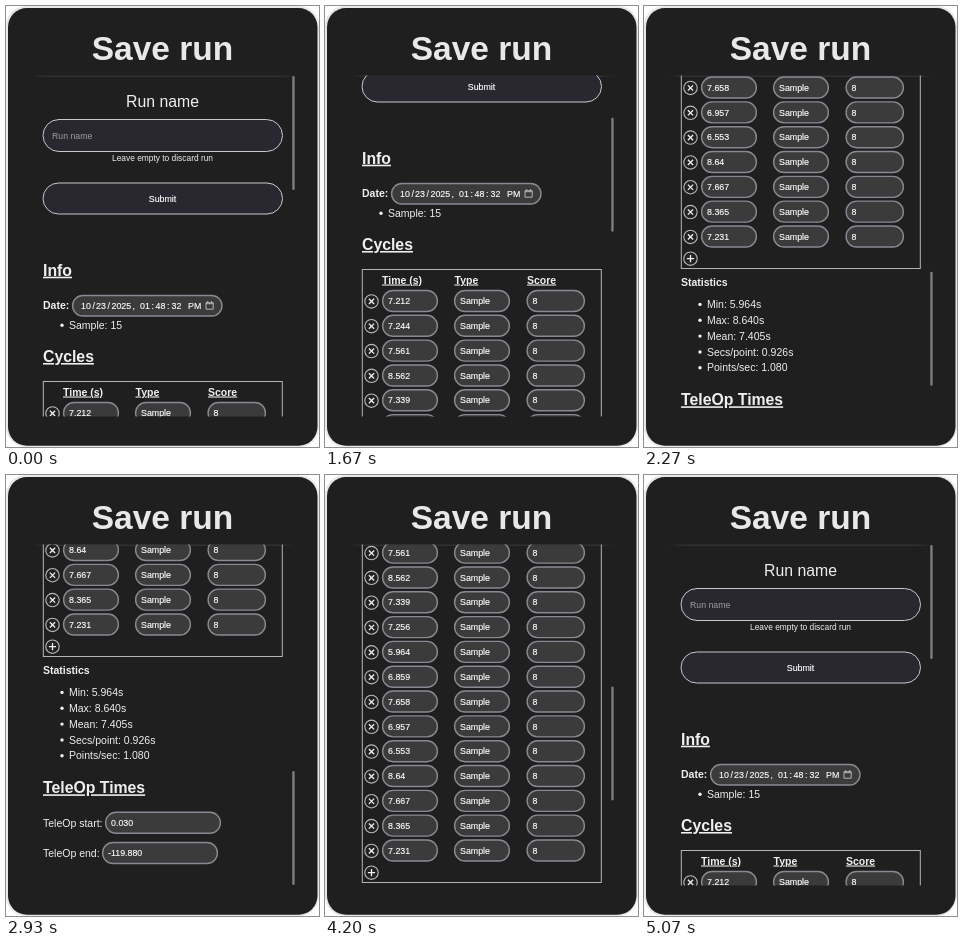
Recreate the animation shown at these times as an HTML page. Size 313 by 441 pixels, loop 5.87 s.

```html
<!DOCTYPE html>
<html lang="en">
<head>
<meta charset="utf-8">
<title>Save run</title>
<style>
html, body { margin: 0; width: 100%; height: 100%; overflow: hidden; background: #fff; }
svg { display: block; width: 100%; height: 100%; font: 10.5px "Liberation Sans", Arial, sans-serif; }
text { fill: #efefef; white-space: pre; }
.title { font-size: 33.5px; font-weight: bold; fill: #e8e8e6; }
.label { font-size: 15.8px; }
.heading { font-size: 15.8px; font-weight: bold; text-decoration: underline; }
.column { font-weight: bold; text-decoration: underline; }
.bold { font-weight: bold; }
.value { font-size: 8.85px; fill: #fff; stroke: #fff; stroke-width: .15; }
.hint { font-size: 8.4px; }
.placeholder { font-size: 8.75px; fill: #9d9ca3; }
.middle { text-anchor: middle; }
.pill { fill: #3b3b3c; stroke: #8a8892; stroke-width: 1.4; }
.wide { fill: #292730; stroke: #c9c8cc; stroke-width: 1; }
.frame { fill: none; stroke: #b4b4b4; stroke-width: 1; }
.round { fill: #222; stroke: #b9b8bd; stroke-width: 1.1; }
.mark { fill: none; stroke: #f0f0f0; stroke-width: 1.3; }
.dot { fill: #efefef; }
</style>
</head>
<body>
<svg viewBox="0 0 313 441" preserveAspectRatio="none">
  <defs>
    <clipPath id="view"><rect x="24" y="69.5" width="266" height="341"/></clipPath>
    <linearGradient id="edge">
      <stop offset="0" stop-color="#303030" stop-opacity="0"/>
      <stop offset=".06" stop-color="#303030"/>
      <stop offset=".94" stop-color="#303030"/>
      <stop offset="1" stop-color="#303030" stop-opacity="0"/>
    </linearGradient>
  </defs>
  <rect width="313" height="441" rx="20" fill="#e6eae7"/>
  <rect x="2" y="2" width="309.5" height="437.7" rx="19" fill="#1f1f1f"/>
  <text class="title middle" x="156.5" y="54.2">Save run</text>
  <rect x="24" y="69.5" width="266" height="1.5" fill="url(#edge)"/>
  <g clip-path="url(#view)"><g id="content"></g></g>
  <rect id="thumb" x="286.3" y="70" width="2.3" height="114" rx="1.1" fill="#818181"/>
</svg>
<script>
const LOOP = 5870, FRAME = 1000 / 15, MAX_SCROLL = 605, TRACK = 226;
const content = document.getElementById("content");
const thumb = document.getElementById("thumb");

function add(tag, attrs, label = "") {
  const node = document.createElementNS("http://www.w3.org/2000/svg", tag);
  for (const key in attrs) node.setAttribute(key, attrs[key]);
  node.textContent = label;
  content.append(node);
}
const text = (x, y, label, cls = "") => add("text", { x, y, class: cls }, label);
const path = (d, cls = "mark") => add("path", { d, class: cls });
const pill = (x, y, width, height, cls = "pill") =>
  add("rect", { x, y, width, height, rx: height / 2, class: cls });

function bullet(y, label) {
  add("circle", { cx: 56, cy: y - 3.6, r: 1.7, class: "dot" });
  text(63, y, label);
}
function field(x, cy, width, value) {
  pill(x + .6, cy - 10.5, width - 1.2, 21);
  text(x + 6, cy + 3.2, value, "value");
}
function button(cy, d) {
  add("circle", { cx: 46.5, cy, r: 6.7, class: "round" });
  path(`M46.5 ${cy}${d}`);
}

// Form
text(156.5, 100.7, "Run name", "label middle");
pill(37, 113.5, 239.5, 32, "wide");
text(46, 132.8, "Run name", "placeholder");
text(156.5, 155, "Leave empty to discard run", "hint middle");
pill(37, 177, 239.5, 31, "wide");
text(156.5, 195.7, "Submit", "value middle");

// Info
text(37, 269.7, "Info", "heading");
text(37, 302.8, "Date:", "bold");
pill(66.6, 289.5, 149.4, 20.5);
const dateParts = [[75, "10"], [86.4, "/"], [90, "23"], [101.5, "/"], [105.5, "2025"], [126.5, ","],
  [134, "01"], [145.4, ":"], [149.5, "48"], [160.9, ":"], [165.5, "32"], [182, "PM"]];
for (const [x, part] of dateParts) text(x, 302.8, part, "value");
path("M200 296.7h7.2v6.5h-7.2zM200 297.7h7.2M201.7 295v1.5M205.5 295v1.5", "frame");
bullet(322.8, "Sample: 15");

// Cycles
text(37, 356, "Cycles", "heading");
add("rect", { x: 37.3, y: 375.5, width: 239, height: 411, class: "frame" });
text(57, 389.5, "Time (s)", "column");
text(129.5, 389.5, "Type", "column");
text(202, 389.5, "Score", "column");
const times = "7.212 7.244 7.561 8.562 7.339 7.256 5.964 6.859 7.658 6.957 6.553 8.64 7.667 8.365 7.231";
times.split(" ").forEach((time, i) => {
  const y = 407 + i * 24.82;
  button(y + .4, "m-2.6-2.6l5.2 5.2m0-5.2l-5.2 5.2");
  field(57, y, 56, time);
  field(129, y, 56, "Sample");
  field(201.5, y, 58.5, "8");
});
button(776.7, "m-3.6 0h7.2m-3.6-3.6v7.2");

// Statistics
text(37, 804, "Statistics", "bold");
["Min: 5.964s", "Max: 8.640s", "Mean: 7.405s", "Secs/point: 0.926s", "Points/sec: 1.080"]
  .forEach((line, i) => bullet(826 + i * 15.85, line));

text(37, 923.3, "TeleOp Times", "heading");
text(37, 956.7, "TeleOp start:");
field(99, 952.8, 116, "0.030");
text(37, 986.7, "TeleOp end:");
field(96, 983, 116, "-119.880");

// Scroll legs: start, end (ms), from, to (px), speed at start and end (px/ms)
const legs = [
  [1400, 1933, 9, 285, .25, .78],
  [1933, 2530, 285, MAX_SCROLL, .78, 0],
  [3867, 4533, 581, 150, -.45, -.62],
  [4533, 5000, 150, 0, -.62, 0],
];
function scrollAt(t) {
  for (const [start, end, from, to, v0, v1] of legs) {
    if (t < start || t >= end) continue;
    const d = end - start, u = (t - start) / d, w = 1 - u;
    return from * w * w * (1 + 2 * u) + to * u * u * (3 - 2 * u) + d * u * w * (v0 * w - v1 * u);
  }
  return t >= 2530 && t < 3867 ? MAX_SCROLL : 0;
}
function thumbOpacity(t) {
  if (t < 1200) return Math.min(1, Math.max(0, (1000 - t) / 200));
  return Math.min(1, Math.max(0, (t - 1390) / 140));
}
function draw(now) {
  // Motion advances in steps of 1/15 s
  const t = Math.floor((now % LOOP + 4) / FRAME) * FRAME + .5;
  const y = Math.round(scrollAt(t));
  content.setAttribute("transform", `translate(0 ${-y})`);
  thumb.setAttribute("y", 70 + y / MAX_SCROLL * TRACK);
  thumb.setAttribute("opacity", thumbOpacity(t));
  requestAnimationFrame(() => draw(performance.now() - origin));
}
const origin = performance.now();
draw(0);
</script>
</body>
</html>
```
